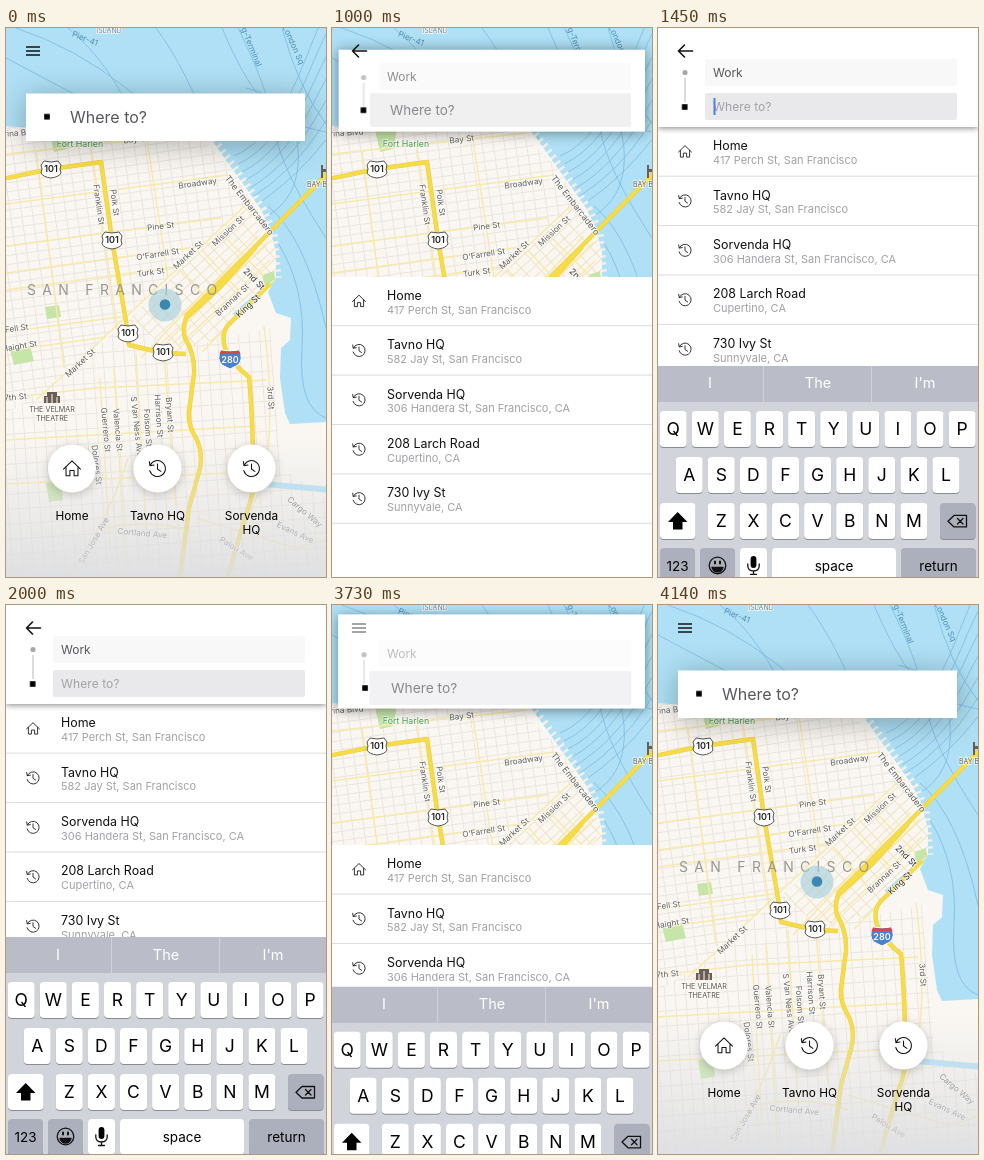
An HTML page for the animation above (4190 ms loop, 320 by 549 pixels).

```html
<!DOCTYPE html>
<html lang="en">
<head>
<meta charset="utf-8">
<title>Ride search</title>
<style>
  html, body { margin: 0; width: 100%; height: 100%; overflow: hidden; background: #fff; }
  svg { display: block; width: 100vw; height: 100vh; font-family: Inter, Roboto, sans-serif; }
  .mid { text-anchor: middle; }
  .line { fill: none; stroke: #111; stroke-linecap: round; stroke-linejoin: round; }
  .ferry { fill: none; stroke: #7dbbe2; stroke-width: .8; }
  .minor { fill: none; stroke: #f8e9ab; stroke-width: 1.4; }
  .edge { fill: none; stroke: #eacb45; stroke-width: 4.4; stroke-linejoin: round; }
  .road { fill: none; stroke: #f7dd45; stroke-width: 3.4; stroke-linejoin: round; }
  .label { fill: #5d5c5a; stroke: #fffc; stroke-width: 1.6; paint-order: stroke; text-anchor: middle; }
  .sea { fill: #4f8fb8; stroke: none; }
  .title { font-size: 12.4px; fill: #111; }
  .sub { font-size: 11px; fill: #a2a2a6; }
</style>
</head>
<body>
<svg viewBox="0 0 320 549" preserveAspectRatio="none">
  <defs>
    <pattern id="gridN" width="11" height="9" patternUnits="userSpaceOnUse" patternTransform="rotate(-8)">
      <path d="M0 .5H11M.5 0V9" stroke="#ebe5de" fill="none"/>
    </pattern>
    <pattern id="gridM" width="13" height="8" patternUnits="userSpaceOnUse" patternTransform="rotate(-43)">
      <path d="M0 .5H13M.5 0V8" stroke="#f0e4c6" fill="none"/>
    </pattern>
    <pattern id="gridS" width="10.5" height="15" patternUnits="userSpaceOnUse" patternTransform="rotate(-4)">
      <path d="M0 .5H10.5M.5 0V15" stroke="#ebe5de" fill="none"/>
    </pattern>
    <linearGradient id="fade" x2="0" y2="1">
      <stop offset="0" stop-color="#e2e3e5" stop-opacity="0"/>
      <stop offset="1" stop-color="#dddee0" stop-opacity=".92"/>
    </linearGradient>
    <clipPath id="landClip"><use href="#land"/></clipPath>
    <g id="house">
      <path class="line" d="M-6.5 .5L0 -5.8L6.5 .5M-4.6 -1V5.6H-1.6V1.6H1.6V5.6H4.6V-1"/>
    </g>
    <g id="clock">
      <path class="line" d="M-5.6 -2.4A6.1 6.1 0 1 1 -5.9 1.6M-6.3 -5.4L-5.8 -2.2L-2.7 -2.7M0 -3.4V.4L2.6 2.2"/>
    </g>
  </defs>

  <g id="map">
    <rect width="320" height="549" fill="#afe0f5"/>
    <g id="ferries"></g>
    <path d="M197 102L212 120L226 139L242 162L256 183L266 205L270 250" fill="none" stroke="#f1f0ea" stroke-width="11" stroke-dasharray="2.5 4.5"/>
    <path id="land" d="M-5 98L40 101L70 96L120 88L165 84L195 98L210 118L224 138L240 160L254 180L264 200L270 225V250L262 264L270 285L285 290L284 312L275 320L274 350L279 385L284 396L322 394V560H-5Z" fill="#faf7f2"/>
    <g clip-path="url(#landClip)">
      <path d="M-5 98L165 84L224 138L245 172L60 345L-5 390Z" fill="url(#gridN)"/>
      <path d="M125 290L245 172L270 205V250L215 310L165 325Z" fill="url(#gridM)"/>
      <path d="M-5 390L60 345L125 290L165 325L215 310L264 300L276 440L320 470V549H-5Z" fill="url(#gridS)"/>
      <path d="M42 98L66 96L61 121L48 124ZM39 279L53 277L55 289L41 291ZM4 322L24 318L28 333L8 337ZM256 247L268 243L270 256L259 259ZM40 455L55 452L57 472L43 474Z" fill="#c6e5a8"/>
      <path d="M228 287L264 256" stroke="#afe0f5" stroke-width="4"/>
      <path d="M250 455L280 458L325 462" stroke="#afe0f5" stroke-width="6" fill="none"/>
    </g>
    <g id="roads"></g>
    <g id="labels"></g>
    <g id="shields"></g>
    <g fill="#6b5d53"><path d="M38 375V368H41V364H51V368H54V375Z"/><path d="M41 369V375M46 366V375M51 369V375" stroke="#fff"/><path d="M315 150V137H317V141H320V144H317V150Z"/></g>
    <circle cx="159" cy="277" r="16.5" fill="#a6cfdc" opacity=".65"/>
    <circle cx="159" cy="276.5" r="5.3" fill="#3b87b0"/>
    <rect y="405" width="320" height="144" fill="url(#fade)"/>
  </g>

  <g id="places"></g>
  <g id="sheet"><rect width="320" height="560" fill="#fff"/></g>

  <rect id="card" fill="#fff"/>
  <g id="work">
    <rect x="47" y="31" width="252" height="27" rx="2" fill="#f8f8f9"/>
    <text x="55" y="49.2" font-size="12" fill="#56565a">Work</text>
  </g>
  <rect id="field" rx="2" fill="#e9e9eb"/>
  <g id="stop"><circle cx="27" cy="44.5" r="2.6" fill="#a7a7ab"/><path d="M27 50V74" stroke="#b9b9bd"/></g>
  <rect id="goal" x="-2.8" y="-2.8" width="5.6" height="5.6"/>
  <text id="ask" font-size="16">Where to?</text>
  <rect id="caret" x="55.5" y="70" width="2" height="17" fill="#4b82dc"/>
  <path id="menu" class="line" stroke-width="1.6" style="stroke-linecap:butt" d="M20 19H34M20 23H34M20 27H34"/>
  <path id="back" class="line" stroke-width="1.6" d="M34.5 23H20.5M26.5 17L20.5 23L26.5 29"/>

  <g id="keys"></g>
</svg>

<script>
const $ = id => document.getElementById(id);
const put = (id, html) => $(id).insertAdjacentHTML('beforeend', html);
const LOOP = 4190;

// Map
const strokes = (list, cls) => list.map(d => `<path class="${cls}" d="${d}"/>`).join('');
const fan = [0, 1, 2, 3, 4, 5, 6].map(i =>
  `M${228 + i * 4} ${128 + i * 8}Q${268 + i * 4} ${112 + i * 6} ${300 + i * 3} ${30 + i * 14}T330 ${-20 + i * 24}`);
put('ferries', strokes([
  'M62 0Q105 35 132 100', 'M10 0Q70 20 120 60T165 90', 'M150 0Q180 40 207 112', 'M216 0Q236 48 256 72T320 104',
  'M232 0Q262 60 268 100T320 210', 'M276 0Q292 60 320 96', 'M0 30Q60 62 118 92', ...fan,
  'M258 190Q296 170 292 120T240 60', 'M272 215Q300 260 296 320T320 390', 'M262 178Q300 210 320 300'
], 'ferry'));

const minor = [
  'M30 372L60 345L245 172', 'M135 330L252 208', 'M150 325L262 214', 'M172 318L264 232', 'M196 324L268 252',
  'M196 222L232 262M214 204L258 248M176 242L212 284', 'M0 126L195 105', 'M0 176L222 147', 'M0 218L215 190', 'M0 245L196 218',
  'M0 262L175 238', 'M0 304L122 288', 'M0 323L100 309', 'M30 122L58 340', 'M85 118L112 306', 'M140 105L162 250', 'M0 370L90 360L260 352',
  'M0 412L250 398', 'M0 456L240 444', 'M94 350L104 520', 'M108 340L120 549', 'M130 326L140 500', 'M158 326L170 480', 'M60 549Q100 500 122 430',
  'M100 500Q150 490 190 505', 'M258 298Q266 360 263 410T228 520', 'M190 490L290 520L320 512'
];
const highway = [
  'M-4 151L45 141L95 134L106 212L122 305L123 317L157 325L180 326',
  'M322 145L246 222L181 287Q176 300 179 310Q189 326 188 346L183 384Q182 398 190 410Q198 426 193 444L183 480L174 549',
  'M250 219L215 258L181 289',
  'M264 256L222 297Q215 306 219 320Q226 336 243 349Q246 380 247 424Q252 458 240 486L222 549'
];
put('roads', strokes(minor, 'minor') + strokes(highway, 'edge') + strokes(highway, 'road'));

const labels = [
  ['Pier-41', 78, 13, 22], ['ISLAND', 103, 5, 0, 7, '#6f8490'], ['g-Terminal', 243, 20, 68], ['London Sq', 285, 18, 66],
  ['Marina Blvd', 9, 108, -4], ['Fort Harlen', 74, 119, 0, 8.8, '#469a4c'], ['Bay St', 130, 114, -7], ['Broadway', 192, 158, -8], ['Franklin St', 90, 177, 82], ['Polk St', 106, 175, 82],
  ['Pine St', 155, 201, -7], ["O'Farrell St", 152, 229, -9], ['Turk St', 145, 247, -8], ['Market St', 184, 229, -43], ['Mission St', 224, 205, -43],
  ['The Embarcadero', 241, 179, 52, 8.7], ['2nd St', 246, 253, 45, 8.6, '#333'], ['Brannan St', 228, 274, -43], ['King St', 244, 280, -43, 8.6, '#333'],
  ['Fell St', 11, 303, -7], ['Haight St', 14, 321, -10], ['Market St', 76, 337, -43], ['17th St', 8, 372, -5],
  ['THE VELMAR', 46, 384, 0, 7.2, '#5b4d43'], ['THEATRE', 46, 392.5, 0, 7.2, '#5b4d43'], ['Valencia St', 109, 402, 85], ['Guerrero St', 97, 402, 85], ['Dolores St', 88, 437, 83],
  ['S Van Ness Ave', 128, 399, 84], ['Folsom St', 139, 400, 86], ['Harrison St', 150, 388, 86], ['Bryant St', 161, 387, 87], ['3rd St', 262, 370, 86],
  ['Cargo Way', 297, 486, 40], ['Evans Ave', 288, 507, 25], ['Cortland Ave', 136, 508, 5], ['San Jose Ave', 90, 514, -60], ['Palou Ave', 229, 523, 32], ['BAY B', 311, 159, 0, 7]
];
put('labels', labels.map(([s, x, y, r, size = 8.2, fill = ''], i) =>
  `<text class="label ${y < 25 && !fill ? 'sea' : ''}" font-size="${size}" transform="translate(${x} ${y}) rotate(${r})" style="fill:${fill}">${s}</text>`).join('') +
  '<text x="21" y="267" font-size="14" letter-spacing="6.3" fill="#999693">SAN FRANCISCO</text>');

put('shields', [[45, 141], [106, 212], [122, 305], [157, 324]].map(([x, y]) => `<g transform="translate(${x} ${y})">
  <path d="M-7 -8Q0 -6 7 -8L10 -4Q8 0 10 4Q8 8 0 9Q-8 8 -10 4Q-8 0 -10 -4Z" fill="#fff" stroke="#555"/>
  <text class="mid" y="3.3" font-size="9" font-weight="600" fill="#222">101</text></g>`).join('') +
  `<g transform="translate(224 331)"><path d="M-9 -9Q0 -7 9 -9Q14 0 8 6L0 10L-8 6Q-14 0 -9 -9Z" fill="#4a82cf" stroke="#fff"/>
  <path d="M-9 -8.5Q0 -6.5 9 -8.5L10.5 -5H-10.5Z" fill="#d5474b"/><text class="mid" y="4.3" font-size="9" font-weight="600" fill="#fff">280</text></g>`);

// Shortcuts and list
const icon = (name, x, y, k, w) => `<use href="#${name}" transform="translate(${x} ${y}) scale(${k})" stroke-width="${w}"/>`;
put('places', [[66, 'house', 'Home'], [151.5, 'clock', 'Tavno HQ'], [245.5, 'clock', 'Sorvenda', 'HQ']].map(([x, name, a, b = '']) =>
  `<circle cx="${x}" cy="440.5" r="24" fill="#fff" style="filter:drop-shadow(0 2px 5px #0003)"/>${icon(name, x, 440.5, 1.3, .8)}
  <text class="mid" x="${x}" y="492" font-size="11.8">${a}</text><text class="mid" x="${x}" y="506" font-size="11.8">${b}</text>`).join(''));

put('sheet', [
  ['Home', '417 Perch St, San Francisco'], ['Tavno HQ', '582 Jay St, San Francisco'], ['Sorvenda HQ', '306 Handera St, San Francisco, CA'],
  ['208 Larch Road', 'Cupertino, CA'], ['730 Ivy St', 'Sunnyvale, CA']
].map(([a, b], i) => `<g transform="translate(0 ${i * 49.4})">${icon(i ? 'clock' : 'house', 27, 24.5, 1, .85)}
  <text class="title" x="55" y="23.3">${a}</text><text class="sub" x="55" y="37">${b}</text>
  <path d="M0 49.2H320" stroke="#dcdce0"/></g>`).join(''));

// Keyboard
const key = (x, y, w, fill, s = '', size = 17.5) => `<rect x="${x}" y="${y + 1}" width="${w}" height="36" rx="4" fill="#898c93"/>
  <rect x="${x}" y="${y}" width="${w}" height="36" rx="4" fill="${fill}"/><text class="mid" x="${x + w / 2}" y="${y + 18 + size * .36}" font-size="${size}">${s}</text>`;
const GREY = '#abb0bc', WHITE = '#fff';
const row = (s, x, y) => [...s].map((c, i) => key(x + i * 32.1, y, 27, WHITE, c)).join('');
put('keys', `<rect width="320" height="230" fill="#d2d4db"/><rect width="320" height="36" fill="#babdc8"/>
  <path d="M105.500 0V36M213.500 0V36" stroke="#d0d2d9"/>` +
  [['I', 52], ['The', 160], ["I'm", 267]].map(([s, x]) => `<text class="mid" x="${x}" y="22.5" font-size="14.5" fill="#fff">${s}</text>`).join('') +
  row('QWERTYUIOP', 1.7, 45) + row('ASDFGHJKL', 17.7, 91) + row('ZXCVBNM', 49.8, 137) +
  key(2, 137, 35.5, WHITE) + key(282, 137, 35.5, GREY) + key(2, 182, 35, GREY, '123', 13.5) + key(42, 182, 35, GREY) +
  key(82, 182, 27, WHITE) + key(114, 182, 124, WHITE, 'space', 13.5) + key(243, 182, 75, GREY, 'return', 13.5) +
  `<path d="M19.700 146L29.500 156H24.500V163.500H15V156H10Z"/>
  <path class="line" stroke-width="1.3" d="M296 149.500H308.500V161H296L290 155.200ZM299.500 152.500L305 158M305 152.500L299.500 158"/>
  <g class="line" stroke-width="1.3"><circle cx="59.500" cy="199.500" r="8.3"/><path d="M54 201.500H65Q63.500 206 59.500 206T54 201.500Z" fill="#111"/><path d="M57 195.500V197.500M62 195.500V197.500" stroke-width="2"/></g>
  <rect x="92.6" y="190" width="5.8" height="12" rx="2.9"/><path class="line" stroke-width="1.3" d="M89.800 198V200Q90 205 95.500 205T101.200 200V198M95.500 205V208.500M92.500 208.500H98.500"/>`);

// Motion: each track is a list of [ms, styles, easing to the next]
const track = (id, steps) => $(id).animate(
  [[0, steps[0][1]], ...steps, [LOOP, steps.at(-1)[1]]].map(([t, style, easing = 'linear']) => ({ offset: t / LOOP, easing, ...style })),
  { duration: LOOP, iterations: Infinity });
const UP = [755, 1165], DOWN = [3572, 3982];
const swap = (id, home, open, mid) => track(id, [
  [UP[0], home, 'ease-in-out'], [UP[1], open],
  [DOWN[0], open, mid ? 'ease-in' : 'ease-in-out'], ...(mid ? [[3730, mid, 'ease-out']] : []), [DOWN[1], home]]);
const at = (x, y, k = 1) => ({ transform: `translate(${x}px, ${y}px) scale(${k})` });
const box = (x, y, w, h) => ({ x: x + 'px', y: y + 'px', width: w + 'px', height: h + 'px' });
const shade = (y, blur, a) => ({ filter: `drop-shadow(0 ${y}px ${blur}px rgba(0, 0, 0, ${a}))` });
const show = opacity => ({ opacity });

swap('card', { ...box(20, 65.5, 279, 47.5), ...shade(4, 15, .3) }, { ...box(0, 0, 320, 99), ...shade(1, 3, .5) },
  { ...box(6, 9, 307, 94.5), ...shade(2, 6, .42) });
swap('sheet', at(0, 549.5), at(0, 99));
swap('places', at(0, 0), at(0, 20));
swap('work', { ...at(0, 12), ...show(0) }, { ...at(0, 0), ...show(1) }, { ...at(0, 4), ...show(.4) });
swap('field', { ...box(20, 66, 279, 47), ...show(0) }, { ...box(47, 65, 252, 27), ...show(1) }, { ...box(37.5, 66, 262, 34), ...show(.55) });
swap('stop', { ...at(14, 15), ...show(0) }, { ...at(0, 0), ...show(1) }, { ...at(5, 5), ...show(.7) });
swap('goal', at(41, 88.7), at(26.7, 79), at(33, 83));
swap('ask', { ...at(64, 95.3), fill: '#55565a' }, { ...at(55, 83.3, .76), fill: '#a3a3a7' }, { ...at(59, 88, .86), fill: '#88888c' });

track('menu', [[755, show(1)], [810, show(0)], [3640, show(0)], [3820, show(1)]]);
track('back', [[755, show(0)], [810, show(1)], [3572, show(1)], [3690, show(0)]]);
track('caret', [[1140, show(0)], [1180, show(1)], [1710, show(1)], [1810, show(0)], [2230, show(0)], [2330, show(1)],
  [2770, show(1)], [2870, show(0)], [3290, show(0)], [3390, show(1)], [3572, show(1)], [3640, show(0)]]);
track('keys', [[1110, 551], [1170, 495], [1230, 431], [1290, 387], [1350, 360], [1450, 338], [1600, 332],
  [3640, 332], [3730, 381], [3800, 438], [3900, 510], [4000, 551]].map(([t, y]) => [t, at(0, y)]));
</script>
</body>
</html>
```
